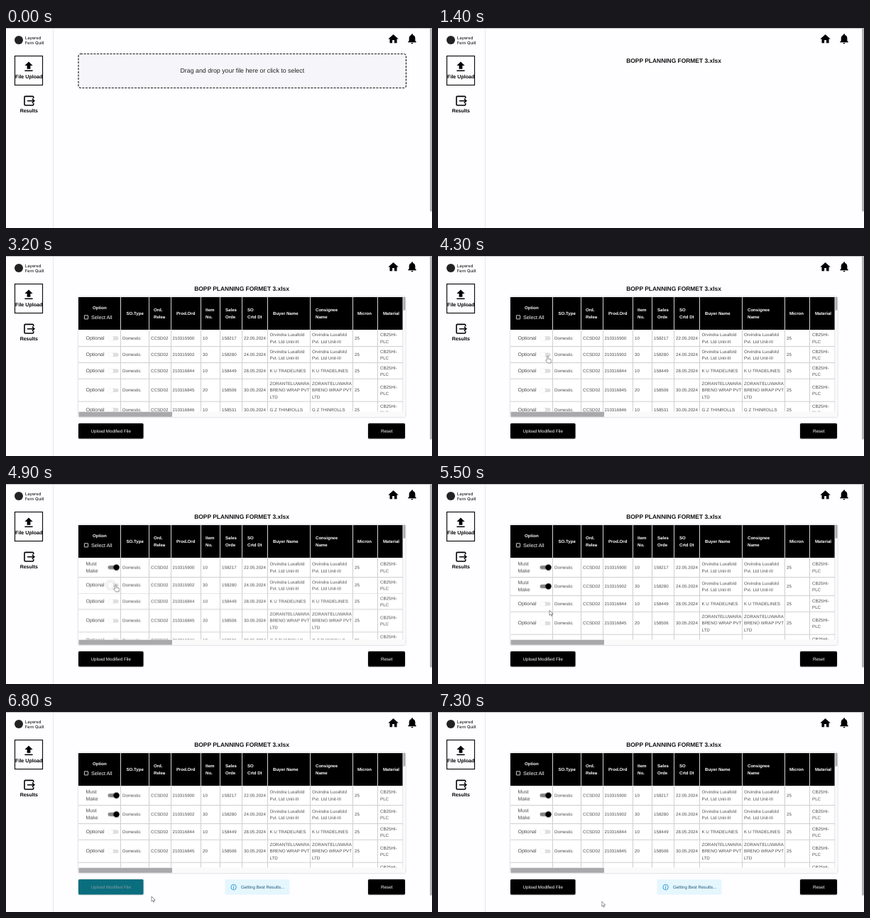
Animation of 600x282 px, one loop 8 s. Source, as an HTML page:

```html
<!DOCTYPE html>
<html lang="en">
<head>
<meta charset="utf-8">
<title>File upload</title>
<style>
html, body { margin: 0; width: 100%; height: 100%; overflow: hidden; background: #fefdff; }
svg { display: block; width: 600px; height: 282px; font-family: "Liberation Sans", Arial, sans-serif; text-rendering: geometricPrecision; }
.bold { font-weight: 700; }
.mid { text-anchor: middle; }
.head { fill: #fff; font: 700 6.1px "Liberation Sans", Arial, sans-serif; }
.cell { fill: #4c4c4c; font-size: 6.2px; }
.label { fill: #4c4c4c; font-size: 7px; }
.grid { stroke: #cfced2; }
.btn { filter: drop-shadow(0 .8px .8px #0004); }
.knob { filter: drop-shadow(0 .5px .6px #0002); }

/* A row grows when its label wraps: its content moves half, the rows below move fully */
.half0 { animation: half0 8s step-end infinite; }
.below0 { animation: below0 8s step-end infinite; }
.half1 { animation: half1 8s step-end infinite; }
.below1 { animation: below1 8s step-end infinite; }
@keyframes half0 { 56.25%, to { transform: translateY(1.75px); } }
@keyframes below0 { 56.25%, to { transform: translateY(3.5px); } }
@keyframes half1 { 65%, to { transform: translateY(1.75px); } }
@keyframes below1 { 65%, to { transform: translateY(3.5px); } }

.upload rect { animation: face 8s steps(2) infinite; }
.upload text { animation: ink 8s steps(2) infinite; }
@keyframes face { 0%, 72.5% { fill: #000; } 75%, 83.75% { fill: #14dcfc; } 86.25%, to { fill: #000; } }
@keyframes ink { 0%, 72.5% { fill: #fff; } 75%, 83.75% { fill: #0b3a48; } 86.25%, to { fill: #fff; } }
</style>
</head>
<body>
<svg viewBox="0 0 600 282">
  <defs><clipPath id="body"><path d="M102 104h457.500v115.500H102z"/></clipPath></defs>
  <path fill="#fefdff" d="M0 0h600v282H0z"/>
  <path fill="#c2c2c4" d="M0 0h597v1H0z"/>
  <path stroke="#e6e5e8" d="M66.500 1v281"/>
  <path fill="#b4b4b6" d="M597 0h3v258.500h-3z"/>

  <circle cx="18" cy="17" r="6" fill="#222"/>
  <g fill="#222" font-family="Inter, sans-serif" font-size="5.9" font-weight="500">
    <text x="26.800" y="15.600">Layered</text>
    <text x="26.800" y="22.600">Fern Quill</text>
  </g>
  <rect x="12.500" y="39.500" width="39" height="41" fill="none" stroke="#111" stroke-width="1.200"/>
  <path transform="translate(22.400 45) scale(.8)" d="M5 20h14v-2H5zM5 10h4v6h6v-6h4l-7-7z"/>
  <text class="bold mid" x="32.200" y="71.200" font-size="7.100">File Upload</text>
  <path fill="none" stroke="#000" stroke-width="1.600" d="M38.700 99.300V97.600q0-1.200-1.200-1.200H27.200Q26 96.400 26 97.600v10.200q0 1.200 1.200 1.200h10.300q1.200 0 1.200-1.200v-1.700M30 102.700h9.500M36.800 99.700l3 3-3 3"/>
  <text class="bold mid" x="32.300" y="119" font-size="7">Results</text>
  <path transform="translate(536.900 6.800) scale(.72)" d="M10 20v-6h4v6h5v-8h3L12 3 2 12h3v8z"/>
  <path transform="translate(563.400 6.500) scale(.72)" d="M12 22c1.100 0 2-.9 2-2h-4c0 1.100.9 2 2 2zm6-6v-5c0-3.100-1.600-5.600-4.500-6.300V4a1.500 1.500 0 0 0-3 0v.7C7.600 5.400 6 7.900 6 11v5l-2 2v1h16v-1z"/>

  <g class="drop">
    <rect x="102" y="36.500" width="461.500" height="48" rx="3" fill="#f6f5f9" stroke="#111" stroke-width="1.100" stroke-dasharray="3 1.600"/>
    <text class="mid" x="332.800" y="63" font-size="8.800" fill="#222">Drag and drop your file here or click to select</text>
  </g>
  <text class="title bold mid" x="332" y="48.700" font-size="8.430" fill="#111">BOPP PLANNING FORMET 3.xlsx</text>

  <g class="table">
    <rect class="btn" x="102" y="57.500" width="460.500" height="169.500" rx="1" fill="#fff"/>
    <path d="M102 58h457v46H102z"/>
    <g id="head"></g>
    <g id="rows" clip-path="url(#body)"></g>
    <path fill="#fafafa" d="M102.500 219.500H562V227H102.500zM559.500 58h3v161.500h-3z"/>
    <path fill="#a9a9ab" d="M102.500 219.700h131.500v7.100H102.500zM559.500 58h3v18.500h-3z"/>
    <g class="btn upload">
      <rect x="102" y="236" width="91.500" height="21.500" rx="1.500"/>
      <text class="mid" x="147.700" y="249.200" font-size="6.200">Upload Modified File</text>
    </g>
    <g class="btn">
      <rect x="510" y="236" width="52" height="21.500" rx="1.500"/>
      <text class="mid" x="536.300" y="249.200" font-size="6.300" fill="#fff">Reset</text>
    </g>
  </g>

  <g class="toast">
    <rect x="308.500" y="236" width="91" height="21.500" rx="2" fill="#e5f6fd"/>
    <circle cx="320.600" cy="247" r="3.700" fill="none" stroke="#0288d1" stroke-width=".8"/>
    <path stroke="#0288d1" stroke-width=".9" d="M320.600 244.800v.9m0 .8v2.700"/>
    <text x="331" y="249.200" font-size="6.150" fill="#1d5a78">Getting Best Results...</text>
  </g>

  <g class="cursor" fill="#fff" stroke="#444" stroke-width=".6" stroke-linejoin="round">
    <path class="hand" d="M-1 1.200a1 1 0 0 1 2 0V4l3.200.8q1 .3.8 1.600L4.400 10H.2l-3-3.600q.2-1.400 1.800-.4z"/>
    <path class="arrow" d="M0 0v7.200l1.700-1.500 1.100 2.500 1.200-.5L2.900 5.200h2.300z"/>
  </g>
</svg>
<script>
const LOOP = 8000;
const $ = id => document.getElementById(id);
const pct = ms => ms / LOOP * 100 + '%';
const text = (cls, x, y, s) => `<text class="${cls}" x="${x}" y="${y}">${s}</text>`;
// Lines centred around y
const lines = (cls, x, y, s, gap) => {
  const parts = s.split('|');
  return parts.map((p, i) => text(cls, x, y + 2.2 + (i - (parts.length - 1) / 2) * gap, p)).join('');
};

const edges = [161.5, 201.5, 232.5, 274.5, 301.5, 332.5, 368.5, 428.5, 488.5, 523.5, 559];
const heads = [[169.5, 'SO.Type'], [208, 'Ord.|Relea'], [240, 'Prod.Ord'], [281, 'Item|No.'], [309, 'Sales|Orde'],
  [340, 'SO|Crtd Dt'], [376, 'Buyer Name'], [436, 'Consignee|Name'], [495, 'Micron'], [531, 'Material']];
$('head').innerHTML = text('head', 122, 74.7, 'Option') +
  '<rect x="110.400" y="83.700" width="5.200" height="5.200" rx=".4" fill="none" stroke="#fff" stroke-width=".8"/>' +
  '<text x="120" y="88.600" font-size="7.200" fill="#fff">Select All</text>' +
  heads.map(([x, s]) => lines('head', x, 80.8, s, 10.5)).join('') +
  edges.map(x => `<path stroke="#d4d4d8" d="M${x} 58v46"/>`).join('');

const cols = [164, 204, 234.5, 277, 304, 335, 371.5, 431, 491, 527];
const firm = 'Orvindra Luxafold|Pvt. Ltd Unit-III';
const orders = [
  [104, 127.5, 210315900, 10, 158217, '22.05.2024', firm],
  [127.5, 150.5, 210315902, 30, 158280, '24.05.2024', firm],
  [150.5, 173.2, 210316844, 10, 158449, '28.05.2024', 'K U TRADELINES'],
  [173.2, 205.2, 210316845, 20, 158506, '30.05.2024', 'ZORANTELUWARA|BRENO WRAP PVT|LTD'],
  [205.2, 228, 210316846, 10, 158531, '30.05.2024', 'G Z THINROLLS']
];

const off = y => lines('label', 112.5, y, 'Optional', 0) +
  `<rect x="145.500" y="${y - 2.5}" width="13" height="5.400" rx="2.700" fill="#dededf"/>` +
  `<circle class="knob" cx="147.300" cy="${y + .2}" r="3.900" fill="#fdfdfd"/>`;
const on = y => lines('label', 112.5, y, 'Must|Make', 9.8) +
  `<rect x="143.500" y="${y - 2.6}" width="14" height="5.400" rx="2.700" fill="#858585"/>` +
  `<circle class="btn" cx="155.500" cy="${y + .1}" r="4.200"/>`;

function row(i) {
  if (i === orders.length) return '';
  const [top, bottom, order, item, sale, date, name] = orders[i];
  const y = (top + bottom) / 2;
  const cells = ['Domestic', 'CCSD02', order, item, sale, date, name, name, 25, 'CB25HI-|PLC'];
  const halo = i === 1 ? `<circle class="halo" cx="147.300" cy="${y}" r="8" fill="#0000000d"/>` : '';
  return `<g class="half${i}">${cells.map((s, c) => lines('cell', cols[c], y, String(s), 9.1)).join('')}${halo}` +
    `<g class="off${i}">${off(y)}</g>${i < 2 ? `<g class="on${i}">${on(y)}</g>` : ''}</g>` +
    `<g class="below${i}"><path class="grid" d="M102 ${bottom}H559"/>${row(i + 1)}</g>`;
}
$('rows').innerHTML = row(0) + edges.map(x => `<path class="grid" d="M${x} 104v116"/>`).join('');

// Visible spans in ms: on, off, on, off ...
const spans = {
  drop: [0, 1400], title: [1400, LOOP], table: [2200, LOOP], toast: [6400, LOOP],
  off0: [0, 4500], on0: [4500, LOOP], off1: [0, 5200], on1: [5200, LOOP],
  halo: [4600, 5300],
  hand: [4300, 5300, 5800, 6700], arrow: [4100, 4300, 5300, 5800, 6700, LOOP]
};
const showCss = ([name, times]) =>
  `.${name}{animation:${name} ${LOOP}ms step-end infinite}@keyframes ${name}{0%{opacity:0}` +
  times.map((ms, i) => `${pct(ms)}{opacity:${1 - i % 2}}`).join('') + '}';

// Pointer stops: ms, x, y; it moves ten times a second
const path = [[0, 162, 200], [4100, 162, 200], [4200, 158, 166], [4300, 154.5, 141], [4400, 153, 120], [4500, 153, 117],
  [4600, 154.5, 142], [5200, 154.5, 142], [5500, 157, 178], [5900, 174, 249], [6500, 174, 249], [6800, 205, 260],
  [7100, 228, 266], [7300, 230.5, 267], [LOOP, 230.5, 267]];
const moveCss = `.cursor{animation:move ${LOOP}ms infinite}@keyframes move{` + path.map(([ms, x, y], i) => {
  const next = path[i + 1] || [ms + 100];
  return `${pct(ms)}{transform:translate(${x}px,${y}px);animation-timing-function:steps(${(next[0] - ms) / 100})}`;
}).join('') + '}';

const style = document.createElement('style');
style.textContent = Object.entries(spans).map(showCss).join('') + moveCss;
document.head.append(style);
</script>
</body>
</html>
```
